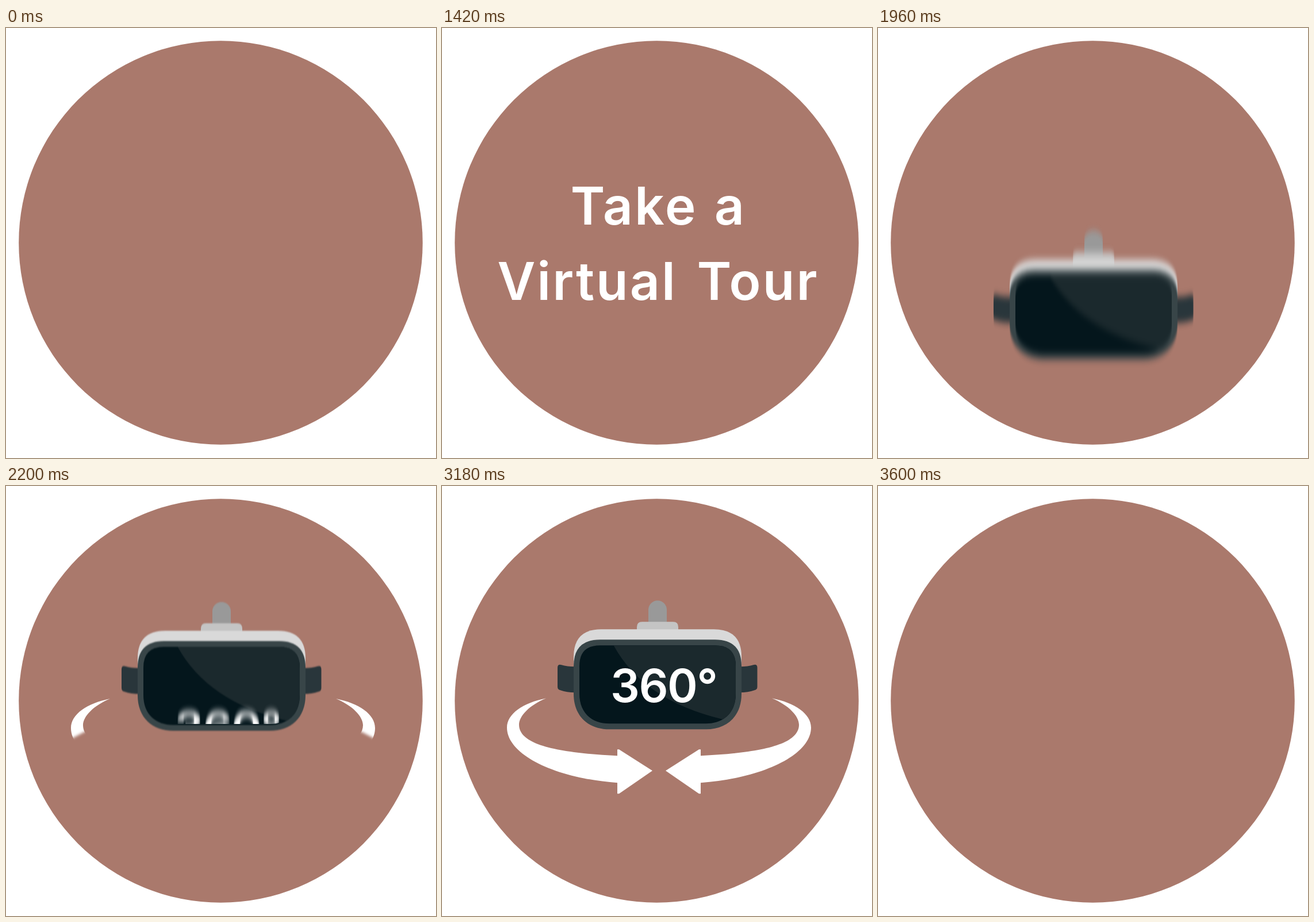
Animation of 748 by 748 pixels, one loop 3.76 s. Source, as an HTML page:

```html
<!DOCTYPE html>
<html lang="en">
<head>
<meta charset="utf-8">
<title>Take a Virtual Tour</title>
<style>
  html, body { margin: 0; width: 100%; height: 100%; overflow: hidden; background: #fff; }
  svg { display: block; width: 100%; height: 100%; }
  text { font: 600 91px Inter, "Open Sans", sans-serif; fill: #fff; letter-spacing: 3px; text-anchor: middle; }
  #degrees text { font-size: 80px; letter-spacing: -1.5px; text-anchor: start; }
</style>
</head>
<body>
<svg viewBox="0 0 748 748">
  <defs id="defs">
    <clipPath id="disc"><circle cx="373.5" cy="373.5" r="351.3"/></clipPath>
    <path id="screen" d="M275 278H475Q511 278 511 314V362C511 396 489 414 459 414H291C261 414 239 396 239 362V314Q239 278 275 278Z"/>
    <clipPath id="screenClip"><use href="#screen"/></clipPath>
    <filter id="soft" filterUnits="userSpaceOnUse" x="0" y="0" width="748" height="748">
      <feGaussianBlur stdDeviation="2.5"/>
    </filter>
    <mask id="reveal" maskUnits="userSpaceOnUse" x="0" y="0" width="748" height="748">
      <g filter="url(#soft)">
        <path id="spine" d="M196 362C146 380 122 400 124 420C126 460 220 494 305 495L376 496"
          pathLength="100" fill="none" stroke="#fff" stroke-width="92"/>
      </g>
    </mask>
    <g id="arrow" mask="url(#reveal)">
      <path fill="#fff" d="M181 370C141 378 113 397 113 421C113 468 196 509 305 517V536H308L366 496L308 459H305V470C205 465 134 452 134 416C134 401 152 382 181 370Z"/>
    </g>
    <path id="strap" fill="#29363b" d="M232 315Q217 315 208 312Q201 310 201 317V350Q201 355 206 356Q217 360 232 360Z"/>
  </defs>

  <circle cx="373.5" cy="373.5" r="351.3" fill="#aa796c"/>
  <g clip-path="url(#disc)">
    <g id="words">
      <g><text x="334" y="342">Take</text></g>
      <g><text x="501.5" y="342">a</text></g>
      <g><text x="252.5" y="473">Virtual</text></g>
      <g><text x="549.5" y="473">Tour</text></g>
    </g>
    <g id="scene">
      <g id="headset">
        <use href="#strap"/>
        <use href="#strap" transform="translate(749.5) scale(-1 1)"/>
        <path fill="#999" d="M359 240V216A16 16 0 0 1 391 216V240Z"/>
        <path fill="#c4c4c4" d="M339 254V246Q339 237 348 237H402Q411 237 411 246V254Z"/>
        <path fill="#d9d9d9" d="M229 330V298Q229 250 277 250H473Q521 250 521 298V330Z"/>
        <path fill="#384548" d="M275 268H475Q521 268 521 314V362C521 402 495 424 459 424H291C255 424 229 402 229 362V314Q229 268 275 268Z"/>
        <use href="#screen" fill="#04161c"/>
        <path clip-path="url(#screenClip)" fill="#1b292d" d="M298 277Q350 373 486 406L520 414V277Z"/>
      </g>
      <g clip-path="url(#screenClip)">
        <g id="degrees"><text x="293" y="377">360°</text></g>
      </g>
      <use href="#arrow"/>
      <use href="#arrow" transform="translate(755) scale(-1 1)"/>
    </g>
  </g>
</svg>
<script>
const LOOP = 3760;
const byId = id => document.getElementById(id);
const clamp = (v, lo = 0, hi = 1) => Math.min(hi, Math.max(lo, v));
const sine = (t, from, to) => (1 - Math.cos(Math.PI * clamp((t - from) / (to - from)))) / 2;
const cube = ms => Math.min(900, 3.94e-5 * Math.max(0, ms) ** 3);

// Each mover shifts vertically by y(t), blurred over its shutter time in ms.
const movers = [];
function addMover(el, shutter, y) {
  const id = 'blur' + movers.length;
  byId('defs').insertAdjacentHTML('beforeend',
    `<filter id="${id}" filterUnits="userSpaceOnUse" x="0" y="0" width="748" height="748"
      color-interpolation-filters="sRGB"><feGaussianBlur/></filter>`);
  movers.push({ el, shutter, y, id, blur: byId(id).firstElementChild });
}

[...byId('words').children].forEach((el, i) =>
  addMover(el, 8, t => cube(292 + 56 * i - t) - cube(t - 1415 - 56 * i)));
addMover(byId('headset'), 20, t => 638 * (1 - sine(t, 1408, 2228)));
addMover(byId('degrees'), 20, t => Math.min(300, 75 * (Math.max(0, 2420 - t) / 220) ** 3));
addMover(byId('scene'), 10, t => -510 * (Math.max(0, t - 3165) / 425) ** 2);

function draw(t) {
  for (const m of movers) {
    const y = m.y(t);
    const sigma = Math.abs(y - m.y(t - m.shutter)) * 0.29;
    m.el.setAttribute('transform', `translate(0 ${y.toFixed(2)})`);
    if (sigma > 0.25) {
      m.blur.setAttribute('stdDeviation', `0 ${sigma.toFixed(2)}`);
      m.el.setAttribute('filter', `url(#${m.id})`);
    } else {
      m.el.removeAttribute('filter');
    }
  }
  byId('spine').setAttribute('stroke-dasharray', `${100 * sine(t, 2000, 2550)} 200`);
  byId('scene').style.display = t < 1500 || t >= 3600 ? 'none' : '';
}

const start = performance.now();
function tick() {
  draw((performance.now() - start) % LOOP);
  requestAnimationFrame(tick);
}
tick();
</script>
</body>
</html>
```
